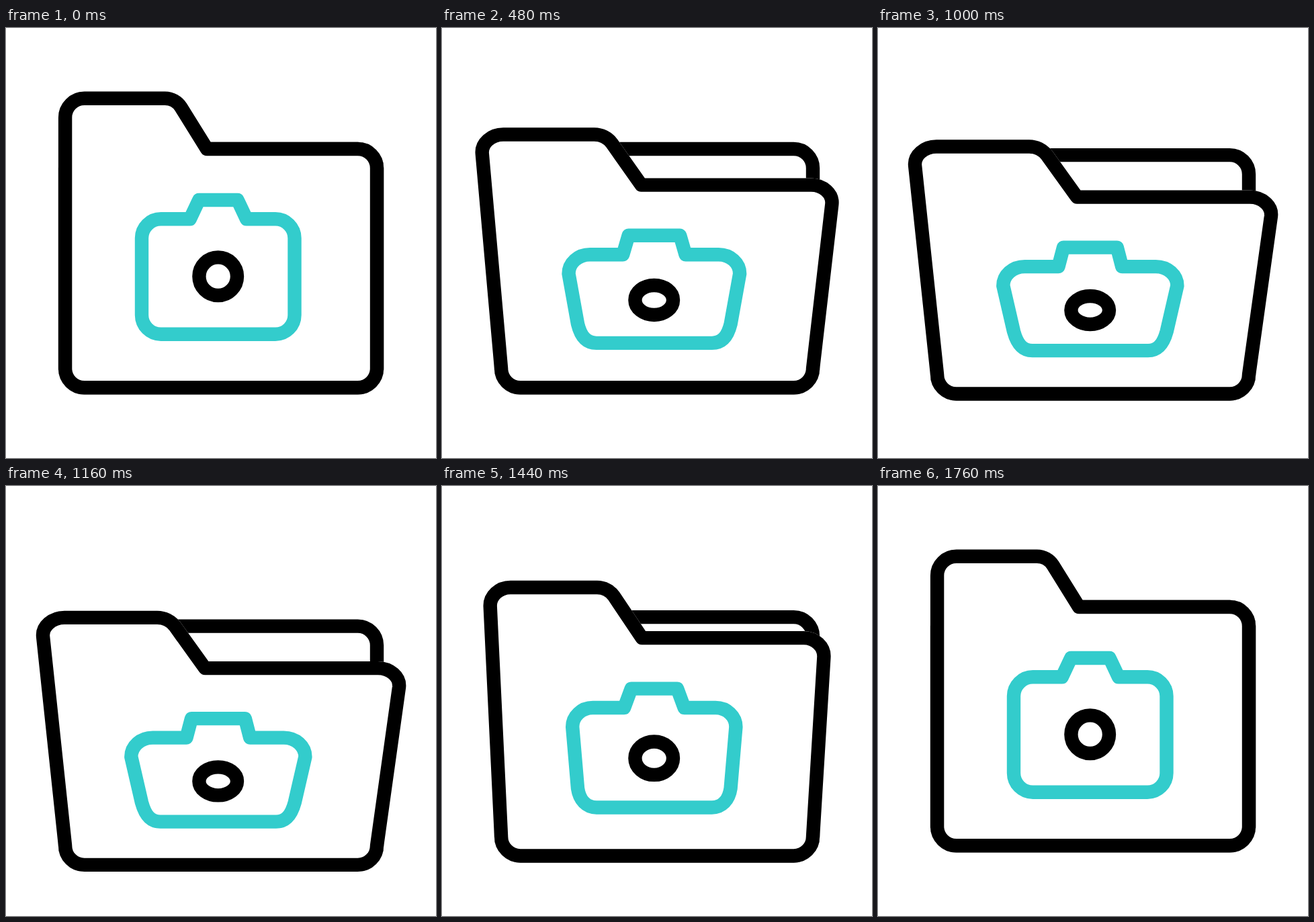
An HTML page that plays this animation: 640x640 px, repeating every 2120 ms.

```html
<!DOCTYPE html>
<html lang="en">
<head>
<meta charset="utf-8">
<title>Photo folder</title>
<style>
  html, body { margin: 0; height: 100%; overflow: hidden; background: #fff; }
  svg { display: block; width: 100vw; height: 100vh; }
  path, rect, ellipse {
    fill: none; stroke: #000; stroke-width: 20.4;
    stroke-linejoin: round; stroke-linecap: round;
  }
  .teal { stroke: #33cccc; }
  .solid { fill: #fff; }
  .mask { fill: #fff; stroke: #fff; }
</style>
</head>
<body>
<svg viewBox="0 0 640 640">
  <g class="dip"><rect class="solid" x="88.1" y="180" width="463.9" height="355.3" rx="28.5"/></g>
  <rect id="paper" class="teal solid" x="119.1" width="399.3" height="245"/>
  <g class="dip">
    <path class="front mask"/>
    <path class="front"/>
    <path id="camera" class="teal"/>
    <ellipse id="lens" cx="315.7" rx="28.3"/>
  </g>
</svg>
<script>
const LOOP = 2120, STEP = 40;

const folder = {
  shut: "M88.1 133.3C88.1 117.6 100.9 104.8 116.6 104.8L236.6 104.8C246.2 104.8 255.2 109.7 260.3 117.8" +
    "L299 180L523.5 180C539.2 180 552 192.8 552 208.5L552 506.8C552 522.5 539.2 535.3 523.5 535.3" +
    "L116.6 535.3C100.9 535.3 88.1 522.5 88.1 506.8Z",
  open: "M55.1 195.8C53.5 180.1 69 167.3 87 167.3L225 167.3C235.5 167.3 245.4 172.2 251.5 180.3" +
    "L296.2 242.5L553.5 242.5C571.5 242.5 586.8 255.3 585 271L552 506.8C552 522.5 539.2 535.3 523.5 535.3" +
    "L116.6 535.3C100.9 535.3 88.1 522.5 88.1 506.8Z"
};

const camera = {
  shut: "M202 312.8C202 297.1 214.8 284.3 230.5 284.3L273.8 284.3L287.2 256L344.6 256L358 284.3" +
    "L401 284.3C416.7 284.3 429.5 297.1 429.5 312.8L429.5 427.2C429.5 442.9 416.7 455.7 401 455.7" +
    "L230.5 455.7C214.8 455.7 202 442.9 202 427.2Z",
  open: "M186.3 374.5C186.3 358.5 200.5 346 218.3 346L268.5 346L276 317.5L355.8 317.5L363.2 346" +
    "L413.4 346C431.2 346 445.4 358.5 445.4 374.5L429.7 442.5C424.5 461.5 416.7 471 402 471" +
    "L229.7 471C215 471 207.2 461.5 202 442.5Z"
};

const $$ = sel => document.querySelectorAll(sel);
const paper = document.getElementById("paper");
const cam = document.getElementById("camera");
const lens = document.getElementById("lens");

const lerp = (a, b, p) => a + (b - a) * p;
const span = (t, from, length) => Math.min(1, Math.max(0, (t - from) / length));
const smooth = u => u * u * (3 - 2 * u);

// cubic-bezier(1/6, 1/6, 2/3, 1), solved by bisection
function settle(x) {
  if (x <= 0 || x >= 1) return x;
  const curve = (s, a, b) => 3 * (1 - s) ** 2 * s * a + 3 * (1 - s) * s * s * b + s ** 3;
  let lo = 0, hi = 1;
  for (let i = 0; i < 24; i++) {
    const mid = (lo + hi) / 2;
    if (curve(mid, 1 / 6, 2 / 3) < x) lo = mid; else hi = mid;
  }
  return curve(lo, 1 / 6, 1);
}

function morph({ shut, open }, p) {
  const ends = open.match(/[\d.]+/g);
  let i = 0;
  return shut.replace(/[\d.]+/g, n => lerp(+n, +ends[i++], p).toFixed(2));
}

function draw(t) {
  const closing = settle(span(t, 1245, 500));
  const p = settle(span(t, 122, 500)) - closing;
  const dip = 30.5 * smooth(span(t, 880, 330)) * (1 - closing);

  const shape = morph(folder, p);
  for (const el of $$(".front")) el.setAttribute("d", shape);
  cam.setAttribute("d", morph(camera, p));
  lens.setAttribute("cy", lerp(369.7, 410.8, p));
  lens.setAttribute("ry", lerp(28.3, 21, p));
  for (const el of $$(".dip")) el.setAttribute("transform", `translate(0 ${dip})`);

  const drop = span(t, 682, 200);
  paper.style.display = drop > 0 && drop < 1 ? "" : "none";
  paper.setAttribute("y", lerp(-20, 520, drop) - 245);
}

function tick() {
  const t = performance.now() % LOOP;
  draw(Math.floor(t / STEP) * STEP);
  requestAnimationFrame(tick);
}
tick();
</script>
</body>
</html>
```
